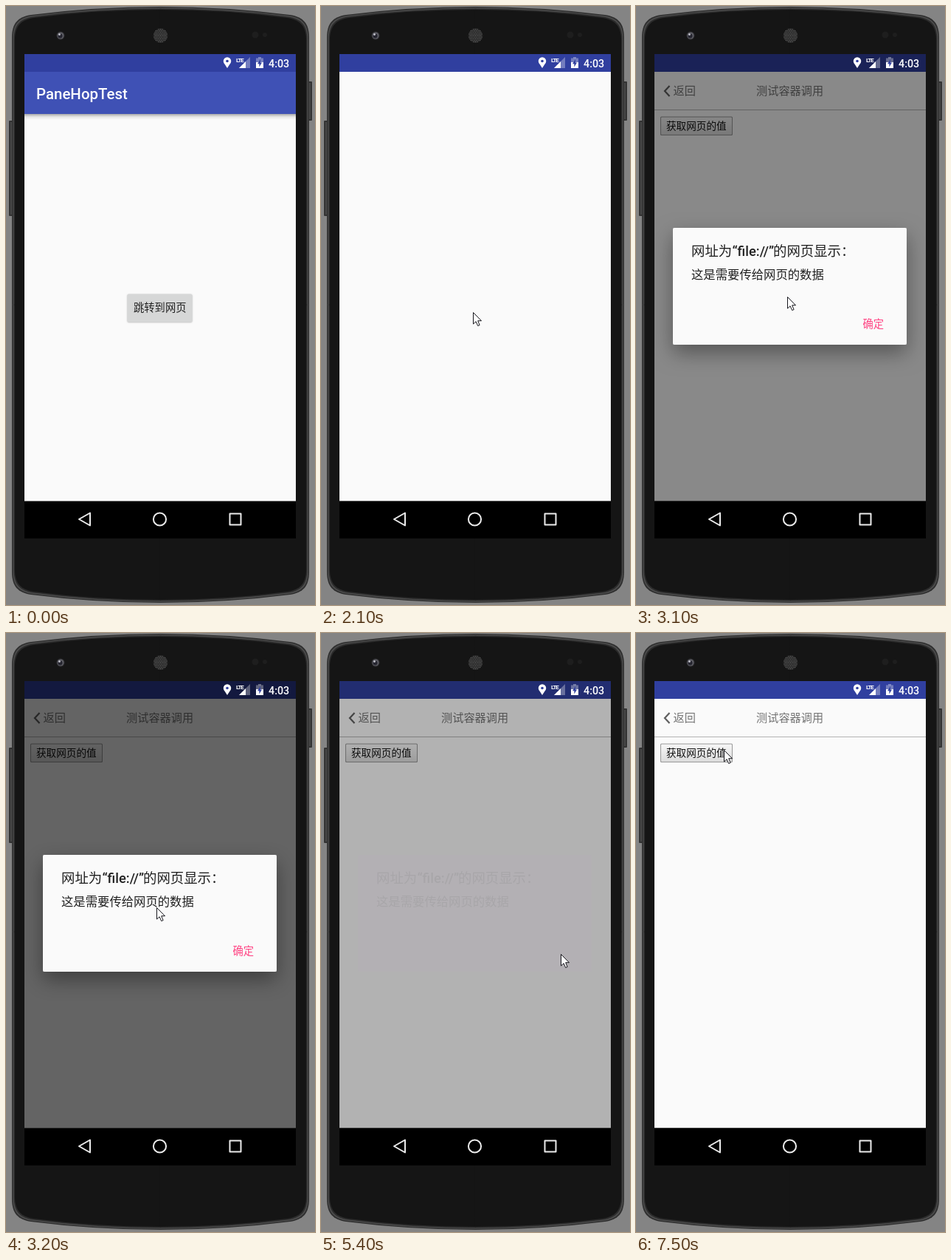
Write an HTML page with a canvas that moves like this. It is 419 px wide and 810 px high and loops after 8000 ms.

```html
<!DOCTYPE html>
<html lang="zh-CN">
<head>
<meta charset="utf-8">
<style>
html, body { margin: 0; width: 100%; height: 100%; overflow: hidden; background: #848484; }
canvas { display: block; }
</style>
</head>
<body>
<canvas id="stage" width="419" height="810"></canvas>
<script>
const ctx = document.getElementById('stage').getContext('2d');
const LOOP = 8000;
const CJK = '"Noto Sans CJK SC", "Noto Sans CJK", sans-serif';
const LATIN = 'Roboto, sans-serif';
const LEFT = 25, TOP = 65, WIDTH = 368, HEIGHT = 604.5;

// Cursor strokes after its entry at START
const START = { x: 134, y: 328 };
const MOVES = [
  { from: 800, to: 1200, x: 212, y: 372 },
  { from: 1200, to: 1400, x: 206, y: 414 },
  { from: 3000, to: 3200, x: 204, y: 371 },
  { from: 3500, to: 4400, x: 325, y: 434 },
  { from: 6200, to: 7100, x: 178, y: 256 },
  { from: 7100, to: 7500, x: 119, y: 158 }
];

const clamp = v => Math.max(0, Math.min(1, v));

function rect(x, y, w, h, color) {
  ctx.fillStyle = color;
  ctx.fillRect(x, y, w, h);
}

function box(x, y, w, h, r, color) {
  ctx.beginPath();
  ctx.roundRect(x, y, w, h, r);
  ctx.fillStyle = color;
  ctx.fill();
}

function disc(x, y, r, color) {
  ctx.beginPath();
  ctx.arc(x, y, r, 0, Math.PI * 2);
  ctx.fillStyle = color;
  ctx.fill();
}

function poly(points, closed = true) {
  ctx.beginPath();
  points.forEach(([x, y]) => ctx.lineTo(x, y));
  if (closed) ctx.closePath();
}

function fillPoly(points, color) {
  poly(points);
  ctx.fillStyle = color;
  ctx.fill();
}

function text(str, x, y, size, color, family = CJK, weight = 400) {
  ctx.font = `${weight} ${size}px ${family}`;
  ctx.fillStyle = color;
  ctx.fillText(str, x, y);
}

function gradient(y0, y1, ...colors) {
  const g = ctx.createLinearGradient(0, y0, 0, y1);
  colors.forEach((c, i) => g.addColorStop(i / (colors.length - 1), c));
  return g;
}

function shadow(color, blur, dy) {
  ctx.shadowColor = color;
  ctx.shadowBlur = blur;
  ctx.shadowOffsetY = dy;
}

// Phone body as four mirrored quarters, moved inwards by inset
function casing(inset, color) {
  const w = 201.5 - inset, h = 403 - inset;
  ctx.fillStyle = color;
  for (const sx of [-1, 1]) {
    for (const sy of [-1, 1]) {
      ctx.save();
      ctx.translate(209.5, 404);
      ctx.scale(sx, sy);
      ctx.beginPath();
      ctx.moveTo(-1, -1);
      ctx.lineTo(w, -1);
      ctx.lineTo(w, h - 42);
      ctx.bezierCurveTo(w, h - 22, w - 8, h - 14, w - 26, h - 11);
      ctx.quadraticCurveTo(90, h, -1, h);
      ctx.fill();
      ctx.restore();
    }
  }
}

function sideKey(x, y, h) {
  box(x, y, 6, h, 1, '#333');
  rect(x + 2, y + 2, 2, h - 4, '#484848');
}

function phone() {
  rect(0, 0, 419, 810, '#848484');
  sideKey(4, 155, 129);
  sideKey(409, 102, 53);
  ['#2e2e2e', '#4c4c4c', '#2c2c2c', '#151515'].forEach((c, i) => casing(i * 1.3, c));

  disc(74, 40, 5.5, '#303033');
  disc(74, 40, 4.5, '#5c5c63');
  disc(73.5, 40.5, 3, '#25252f');
  disc(72.5, 38.5, 1.4, '#c4c4cc');

  disc(209.5, 40, 10, '#262626');
  for (let j = -4; j <= 4; j++) {
    for (let i = -4; i <= 4; i++) {
      const x = i * 2.4 + (j & 1) * 1.2, y = j * 2.1;
      if (Math.hypot(x, y) < 9.2) disc(209.5 + x, 40 + y, 0.65, '#6e6e6e');
    }
  }
  disc(338, 39, 4.5, '#1e1e1e');
  disc(351, 39, 3, '#1e1e1e');
}

function home() {
  rect(LEFT, TOP, WIDTH, HEIGHT, '#fafafa');
  rect(LEFT, 146, WIDTH, 8, gradient(146, 154, 'rgba(0,0,0,.32)', 'rgba(0,0,0,.08)', 'rgba(0,0,0,0)'));
  rect(LEFT, TOP, WIDTH, 24, '#303f9f');
  rect(LEFT, 89, WIDTH, 57, '#3f51b5');
  text('PaneHopTest', 41, 126, 20.44, '#fff', LATIN, 500);
  ctx.save();
  shadow('rgba(0,0,0,.25)', 2, 0.5);
  box(164.5, 389.5, 88, 38, 2, '#d6d7d7');
  ctx.restore();
  text('跳转到网页', 173, 413, 14.3, '#212121');
}

function page(loaded) {
  rect(LEFT, TOP, WIDTH, HEIGHT, '#fafafa');
  rect(LEFT, TOP, WIDTH, 24, '#303f9f');
  rect(LEFT, TOP + HEIGHT, WIDTH, 50.5, '#000');
  if (!loaded) return;
  rect(LEFT, 140, WIDTH, 1, '#b4b4b4');
  poly([[45.5, 108], [39, 115], [45.5, 122]], false);
  ctx.strokeStyle = '#5f5f5f';
  ctx.lineWidth = 2.2;
  ctx.stroke();
  text('返回', 50.5, 120, 15.2, '#757575');
  text('测试容器调用', 163, 120, 15.2, '#757575');
  box(33, 149.5, 98, 25.5, 1.5, '#999');
  box(34, 150.5, 96, 23.5, 1, gradient(150, 174, '#f7f7f7', '#dcdcdc'));
  text('获取网页的值', 41, 167, 13.63, '#111');
}

function panel(color) {
  box(50, 300, 317, 158, 2, color);
}

function dialogText(ink) {
  text('网址为', 75, 338.4, 18.4, ink);
  text('“file://”', 130.4, 338.4, 18.4, ink, LATIN, 500);
  text('的网页显示：', 186, 338.4, 18.4, ink);
  text('这是需要传给网页的数据', 75, 369, 16.35, ink);
}

function dialog(alpha) {
  ctx.save();
  ctx.globalAlpha = alpha;
  // The shadow stays outside, so a translucent panel is not darkened
  ctx.save();
  ctx.beginPath();
  ctx.rect(LEFT, TOP, WIDTH, HEIGHT);
  ctx.roundRect(50, 300, 317, 158, 2);
  ctx.clip('evenodd');
  shadow('rgba(0,0,0,.38)', 28, 11);
  panel('#fafafa');
  ctx.restore();
  panel('#fafafa');
  dialogText('#212121');
  text('确定', 307.5, 434.8, 14.3, '#ff4081');
  ctx.restore();
}

function statusIcons() {
  const dim = 'rgba(255,255,255,.32)';
  fillPoly([[295.2, 76.5], [304.8, 76.5], [300, 84]], '#fff');
  disc(300, 74.4, 5.2, '#fff');
  disc(300, 74.5, 1.8, '#303f9f');

  fillPoly([[316, 84], [331, 84], [331, 69]], dim);
  fillPoly([[316, 84], [325, 84], [325, 75]], '#fff');
  ctx.letterSpacing = '-1.1px';
  text('LTE', 312, 75.5, 8, '#fff', LATIN, 700);
  ctx.letterSpacing = '0px';

  rect(342, 69, 4, 2, dim);
  rect(339, 70.5, 10, 5.5, dim);
  rect(339, 76, 10, 8, '#fff');
  fillPoly([[345, 72], [341, 78.2], [343.4, 78.2], [343.4, 82.5], [347, 76.4], [345, 76.4]], '#303f9f');
  text('4:03', 356, 82.5, 14.3, '#fff', LATIN, 500);
}

function navIcons() {
  ctx.strokeStyle = '#ececec';
  ctx.lineWidth = 2;
  ctx.lineJoin = 'round';
  poly([[99, 694], [114, 685.5], [114, 702.5]]);
  ctx.stroke();
  ctx.beginPath();
  ctx.arc(208.5, 694, 8.6, 0, Math.PI * 2);
  ctx.stroke();
  ctx.strokeRect(303.5, 686.5, 15, 15);
  ctx.lineJoin = 'miter';
}

function cursor(t) {
  if (t < MOVES[0].from) return;
  let { x, y } = START;
  for (const m of MOVES) {
    const k = clamp((t - m.from) / (m.to - m.from));
    x += (m.x - x) * k;
    y += (m.y - y) * k;
  }
  ctx.save();
  ctx.translate(Math.round(x) + 0.5, Math.round(y) + 0.5);
  poly([[0, 0], [0, 15.5], [3.6, 12.2], [6.2, 18], [8.6, 17], [6.2, 11.2], [11, 11.2]]);
  ctx.fillStyle = '#fff';
  ctx.fill();
  ctx.strokeStyle = '#16161c';
  ctx.lineWidth = 1;
  ctx.stroke();
  ctx.restore();
}

function screen(t) {
  rect(LEFT, TOP, WIDTH, 655, '#000');
  if (t < 2200) home();
  if (t >= 1900) {
    // The new page rises and fades in
    const since = t - 1884;
    ctx.save();
    ctx.beginPath();
    ctx.rect(LEFT, TOP, WIDTH, 655);
    ctx.clip();
    ctx.globalAlpha = clamp(since / 200);
    ctx.translate(0, Math.round(52 * (1 - clamp(since / 350)) ** 5));
    page(t >= 2200);
    ctx.restore();
  }
  if (t >= 3000 && t < 5500) {
    const closing = t >= 5400;
    const shade = closing ? 0.29 : Math.min(0.6, 0.056 + (t - 3000) / 100 * 0.4);
    rect(LEFT, TOP, WIDTH, HEIGHT, `rgba(0,0,0,${shade})`);
    if (closing) {
      panel('#b3b0b4');
      dialogText('#a8a6a9');
    } else dialog(t < 3100 ? 0.56 : 1);
  }
  statusIcons();
  navIcons();
}

function frame(now) {
  const t = Math.floor(now % LOOP / 100) * 100;
  phone();
  screen(t);
  cursor(t);
  requestAnimationFrame(frame);
}
requestAnimationFrame(frame);
</script>
</body>
</html>
```
